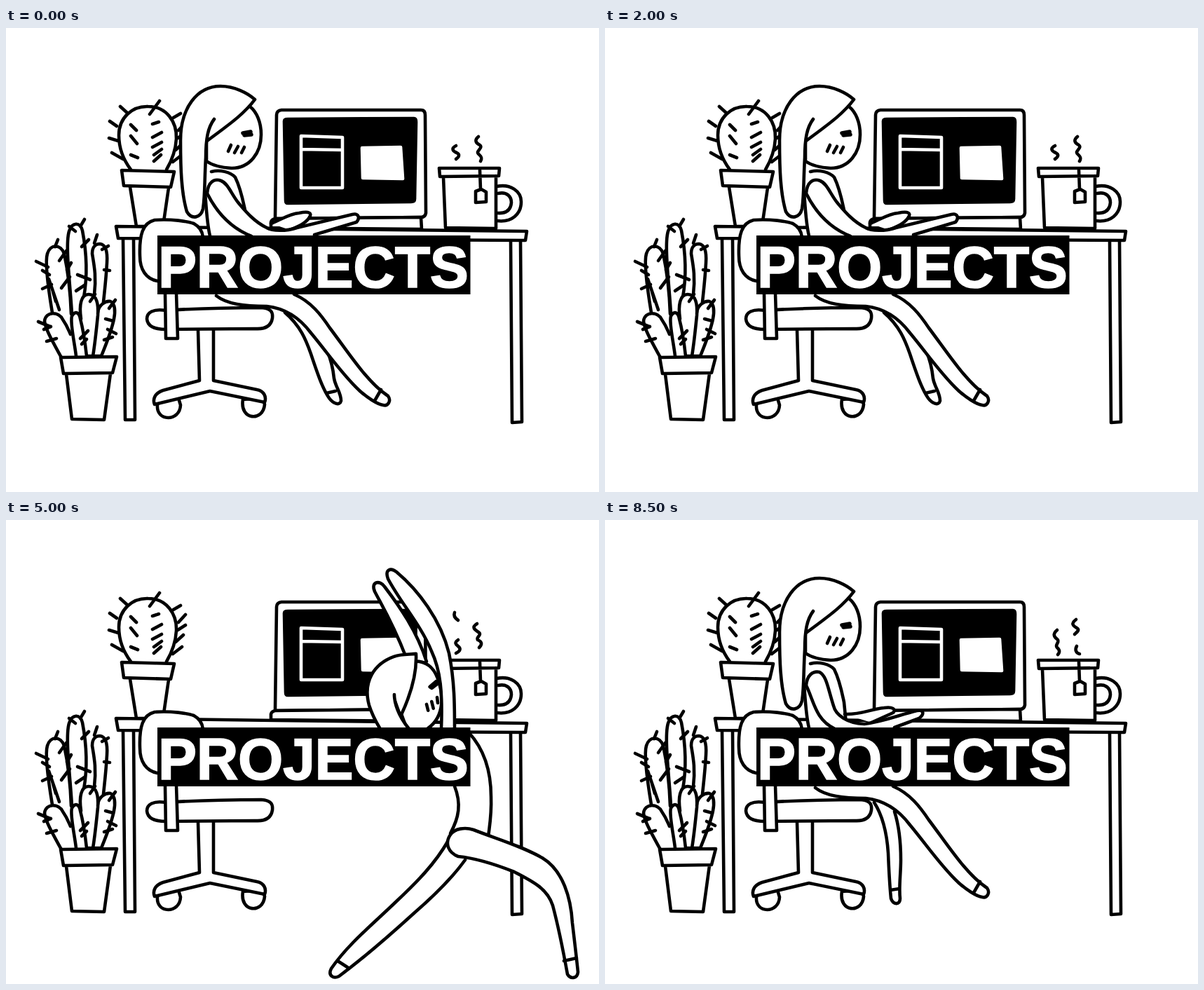
These frames come from a looping animation (846x662 px, 9 s). An HTML page:

```html
<!DOCTYPE html>
<html lang="en">
<head>
<meta charset="utf-8">
<title>Projects</title>
<style>
  html, body { margin: 0; width: 100%; height: 100%; overflow: hidden; background: #fff; }
  svg { display: block; width: 100%; height: 100%; }
  path { fill: #fff; stroke: #000; stroke-width: 4.6; stroke-linecap: round; stroke-linejoin: round; }
  .line, .line path { fill: none; }
  .ink { fill: #000; }
  .window { fill: none; stroke: #fff; stroke-width: 4.6; }
  .thick { fill: none; stroke-width: 5.5; }
  [data-in] { display: none; }
  text {
    font: bold 82.7px "Liberation Sans", Arial, sans-serif; font-kerning: none; letter-spacing: -.4px;
    fill: #fff; stroke: #fff; stroke-width: 1.6;
  }
</style>
</head>
<body>
<svg viewBox="0 0 846 662">
  <defs>
    <path id="face" d="M660 182C680 186 688 200 688 217C688 247 676 276 645 281L622 281V210Z"/>
    <g id="features" class="line">
      <path class="thick" d="M668 224L678 219M670 226L679 222"/>
      <path d="M657 247V256M665 245V255M674 241L673 249"/>
    </g>
    <g id="hair">
      <path class="ink" d="M630 280L645 284L641 293Z" stroke-width="2"/>
      <path d="M622 218C616 235 619 258 628 279C632 287 636 292 641 297H598C588 270 582 245 583 220C586 185 610 167 640 167C652 167 662 172 671 174C663 200 645 225 622 248"/>
    </g>
    <g id="standing-head">
      <use href="#face"/><use href="#features"/><use href="#hair"/>
    </g>
    <path id="back-leg" d="M630 459C612 490 588 515 556 545C525 575 488 605 464 640C459 650 467 655 475 651C514 622 548 592 582 561C612 535 637 510 655 485M473 629L487 638"/>
    <g id="lunge">
      <use href="#back-leg"/>
      <path d="M634 449C640 440 655 438 667 442C700 455 735 465 765 482C795 500 806 540 808 575C811 600 814 625 816 645C815 655 805 655 801 648C795 615 788 580 780 550C772 525 750 515 725 502C695 490 665 482 645 480C632 475 625 462 634 449ZM796 629L814 625"/>
    </g>
  </defs>

  <g id="small-cactus">
    <path d="M178 202C166 186 161 170 161 153C161 128 180 111 203 112C229 112 244 134 243 158C242 176 236 190 229 202"/>
    <path class="line" d="M163 112L174 122M148 133L158 140M147 157L160 161M151 178L167 187M205 123L219 104M237 129L249 122M246 146L256 135M245 157L256 150M242 174L253 164M238 191L251 181M178 138L186 146M178 154L187 165M178 181L188 185M209 137L218 134M209 156L222 149M209 170L222 163M211 181L222 173M211 190L221 181"/>
    <path d="M177 227L186 283H224L232 228M165 203L240 205L235 227L168 225Z"/>
  </g>

  <g id="desk">
    <path d="M167 301L170 559L184 559L182 301M720 304L722 563L736 562L734 303"/>
    <path d="M157 283L384 286L743 290L741 303L160 300Z"/>
  </g>

  <g id="tall-cactus">
    <path d="M66 406C60 370 55 335 59 322C63 308 78 308 83 322C88 345 92 380 93 408"/>
    <path d="M94 408C92 370 84 310 90 290C94 277 106 276 109 289C114 315 117 350 111 384"/>
    <path d="M126 380C129 355 126 340 123 322C123 312 128 308 134 308C143 309 145 320 144 335C143 355 141 372 139 391"/>
    <path d="M131 406C132 395 142 389 149 390C156 393 156 405 154 415C150 435 141 455 136 468H124"/>
    <path d="M107 415C104 395 107 380 118 380C130 380 132 395 131 410C129 430 127 450 124 468H114"/>
    <path d="M80 472C68 450 56 430 55 418C57 404 75 404 81 416C88 426 90 433 92 437"/>
    <path d="M100 468C98 450 91 420 94 411C98 404 104 404 106 415C110 430 113 450 115 468"/>
    <path class="line" d="M43 333L60 341M70 312L74 302M76 332L86 318M52 346L62 352M52 372L65 366M61 358L76 402M67 376L71 390M79 371L91 355M90 283L99 290M106 283L112 273M108 312L118 302M87 345L93 335M102 352L120 359M126 307L130 295M137 316L146 311M140 345L148 346M100 375L112 367M46 419L63 426M54 430L64 426M58 447L72 443M106 443L117 432M108 451L115 444M120 390L127 380M147 400L156 388M142 415L153 418M145 430L157 436M140 445L152 441"/>
    <path d="M86 494L94 558L140 559L149 493M78 470L158 469L152 492L82 493Z"/>
  </g>

  <g id="computer">
    <path d="M384 272L386 124Q386 118 393 117L592 117Q598 117 598 124L599 264Q598 270 592 270Z"/>
    <path d="M378 285V277Q379 273 384 272L592 270L593 287Z"/>
    <path class="ink" d="M397 133Q397 130 402 130L582 129Q585 129 585 134L583 244Q583 248 578 248L402 250Q399 250 399 246Z"/>
    <path class="window" d="M421 154L480 156L480 228L421 228ZM421 173L480 174"/>
    <path class="window" style="fill:#fff" d="M508 171L563 170L566 215L509 214Z"/>
  </g>

  <g id="mug">
    <path d="M700 226C720 222 735 233 735 248C735 265 722 278 700 275M702 236C715 233 721 241 721 249C720 260 713 265 701 264"/>
    <path d="M624 213L627 285L699 286V211M618 200L704 200L703 211L619 212ZM676 203L677 230M670 233L678 230L685 234L685 248L670 249Z"/>
  </g>

  <g id="steam" class="line">
    <path data-in="AX" d="M642 168C634 172 638 176 643 178C649 181 645 185 642 187M674 155C668 160 670 164 676 167C680 170 674 174 673 177C672 181 682 182 677 190"/>
    <path data-in="B" d="M645 157C638 163 641 167 645 170C650 174 641 178 645 182C650 186 648 190 646 192M672 142C664 148 668 151 673 154C678 157 673 160 670 163M673 180C670 185 672 190 677 191"/>
    <path data-in="T" d="M640 132C638 137 642 141 645 143M672 148C664 153 668 156 674 160C680 164 670 167 673 171C680 174 679 178 675 182M645 171C638 176 643 178 646 181C650 185 646 188 642 190"/>
  </g>

  <g id="seated-legs">
    <path data-in="A" d="M398 406C420 425 428 445 435 465C445 495 452 515 461 528C466 535 476 540 478 532C478 520 470 512 468 500C465 470 455 450 440 432M457 521L470 518"/>
    <path data-in="B" d="M384 403C395 420 402 445 404 475C405 500 406 520 408 540C411 549 421 550 421 540C419 525 422 505 422 485C422 455 419 435 413 416M407 528L420 526"/>
    <path data-in="AB" d="M300 382C315 394 340 397 372 397C400 400 420 415 435 435C460 465 480 495 505 518C515 527 530 537 538 538C545 540 550 532 545 525C515 505 490 465 462 428C450 410 435 390 411 380M535 516L527 530"/>
  </g>

  <g id="chair">
    <path d="M216 361C200 358 191 345 191 325C190 295 195 278 212 274C235 272 260 276 268 279C277 284 280 290 281 298V361"/>
    <path d="M216 538C214 562 248 562 249 538L246 528H218ZM338 530C333 560 367 562 369 537L366 528Z"/>
    <path d="M274 431L276 503L224 517C212 521 209 530 212 537L291 518L369 534C372 526 368 518 358 516L296 503V431"/>
    <path d="M228 403C210 400 201 406 201 415C202 426 212 430 228 430L355 429C368 430 378 426 380 414C381 405 378 400 364 399C330 399 290 399 228 403Z"/>
    <path d="M227 378L228 443L245 443L243 378"/>
  </g>

  <g id="seated" data-in="AB">
    <path d="M284 234C286 260 287 285 292 300H345L341 260C337 240 333 225 327 213C320 205 305 202 293 205"/>
    <g data-in="A">
      <path d="M378 279C395 272 405 265 418 264C428 262 436 262 434 268C430 277 420 282 405 288"/>
      <path d="M350 297C320 285 300 262 287 236C288 220 297 214 307 218C317 222 322 238 332 250C342 262 355 277 372 285C380 290 400 290 415 285L494 266C502 264 506 270 500 277L440 295"/>
    </g>
    <g data-in="B">
      <path d="M342 277C365 278 378 270 398 268C410 266 416 270 411 275L380 289"/>
      <path d="M328 298C300 285 298 258 287 236C288 222 296 215 306 217C316 222 318 240 326 265C329 278 345 290 370 291C400 287 420 278 445 272C455 270 456 277 448 283L413 296"/>
    </g>
    <path d="M348 112C358 120 364 135 364 152C364 178 348 200 322 200C305 199 293 195 286 190V150"/>
    <path d="M297 130C288 142 285 158 285 185C283 220 284 240 281 258C278 271 265 274 258 262C250 235 249 200 249 160C249 115 272 83 306 83C326 83 345 93 355 102C338 125 312 142 287 161"/>
    <path class="thick" d="M338 150L349 148M340 153L350 152"/>
    <path class="line" d="M321 167L317 176M331 169L326 178M340 170L336 178"/>
  </g>

  <g data-in="X">
    <path d="M648 380C648 400 645 420 634 447L689 450C697 425 703 400 702 370C703 345 698 320 683 290H640"/>
    <use href="#back-leg"/>
    <path d="M634 449C645 438 668 440 678 455C690 500 700 560 704 640C704 654 692 654 689 643C682 590 665 530 645 485C630 478 625 462 634 449ZM686 628L703 626"/>
    <use href="#standing-head"/>
    <path d="M676 300C700 330 708 380 702 425C700 437 690 436 689 425C690 390 680 350 660 330"/>
  </g>

  <g data-in="R">
    <path d="M648 380C648 400 645 420 634 447L689 450C697 425 703 400 702 370C703 345 698 320 683 290H640"/>
    <use href="#lunge"/>
    <path d="M662 172C663 140 661 110 656 75C655 56 663 54 668 63C677 85 681 110 680 140C679 158 678 170 676 187"/>
    <use href="#standing-head"/>
    <path d="M640 299C652 290 661 283 668 265C680 235 690 190 690 150C692 120 685 90 682 62C681 48 689 46 695 53C710 75 714 110 712 145C711 190 702 225 692 255C686 275 678 288 668 299"/>
  </g>

  <g data-in="S">
    <path d="M646 380C646 405 645 425 634 447L688 450C695 430 698 410 698 380C700 350 690 315 664 278H630"/>
    <use href="#lunge"/>
    <path d="M625 166C625 130 612 95 606 64C605 48 614 47 620 58C634 85 642 125 640 178"/>
    <use href="#standing-head" transform="translate(0 -10) rotate(-6.9 660 450)"/>
    <path d="M640 299C643 270 655 215 655 165C655 130 638 90 629 52C627 38 637 35 645 44C670 75 678 120 677 165C676 215 662 260 658 299"/>
  </g>

  <g data-in="T">
    <path d="M640 380C650 405 646 425 634 447L688 452C690 435 693 420 692 395C692 365 685 330 660 303H620"/>
    <use href="#lunge"/>
    <path d="M570 194C553 150 538 125 526 102C520 88 533 85 540 95C562 124 586 158 600 202"/>
    <g transform="translate(9 4) rotate(-20 660 450)">
      <use href="#face"/><use href="#hair"/>
    </g>
    <use href="#features" transform="translate(-57 14) rotate(-14 665 248)"/>
    <path d="M621 299C623 245 620 215 607 187C592 150 563 118 545 84C540 70 549 68 557 74C588 100 620 142 632 190C640 230 640 265 640 299"/>
  </g>

  <rect x="216" y="296" width="446.5" height="84"/>
  <text x="217" y="369.6">PROJECTS</text>
</svg>
<script>
  // One letter per half second: A, B type; X gets up; R, S, T stretch.
  const poses = "ABABABBXRSTTTTSRXB";
  const stepMs = 500;
  const parts = document.querySelectorAll("[data-in]");

  function draw(now) {
    const pose = poses[Math.floor(now / stepMs) % poses.length];
    for (const part of parts) {
      part.style.display = part.dataset.in.includes(pose) ? "inline" : "none";
    }
  }

  const start = performance.now();
  function tick() {
    draw(performance.now() - start);
    requestAnimationFrame(tick);
  }
  tick();
</script>
</body>
</html>
```
